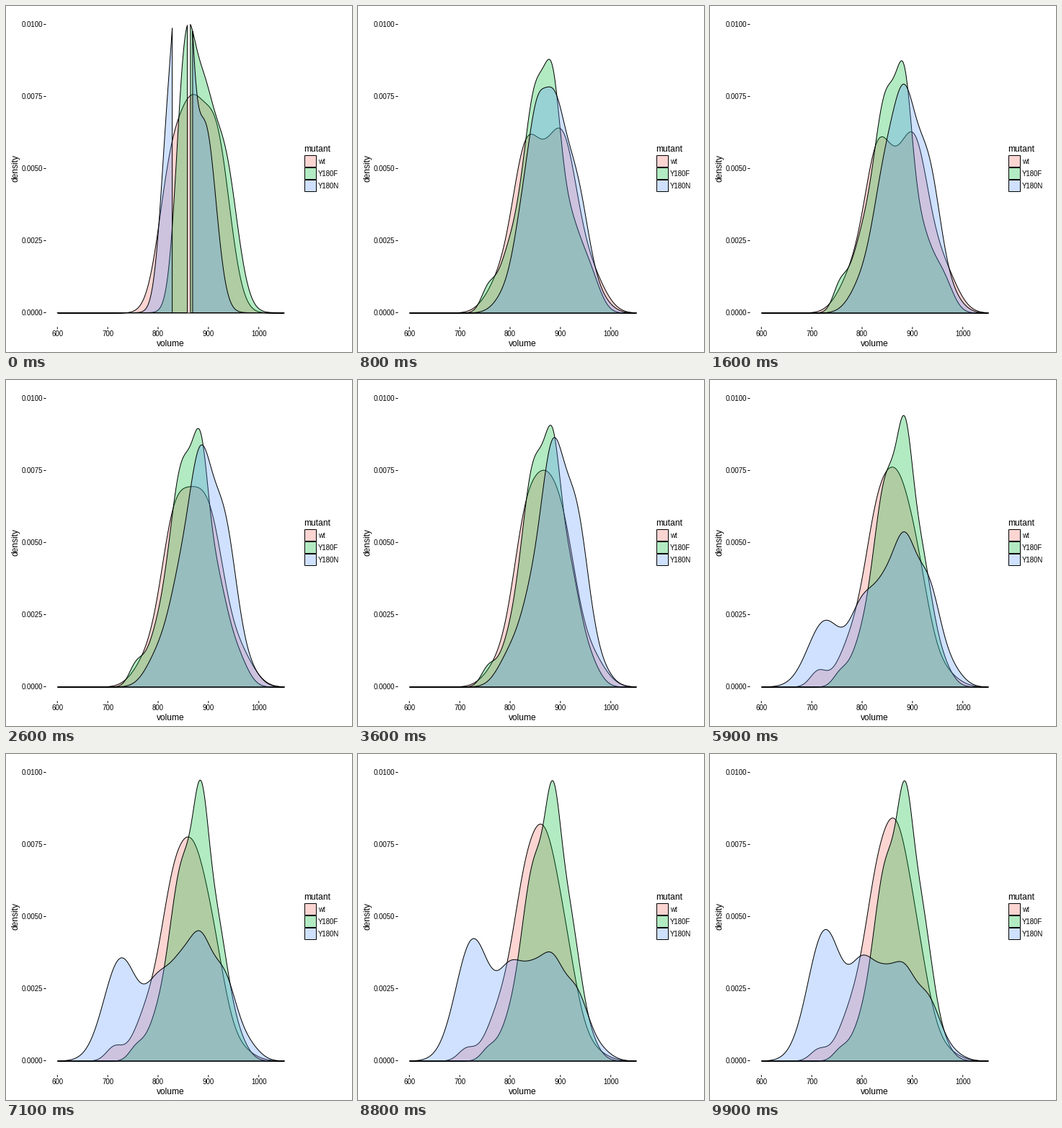
Write a matplotlib script that moves like this. It is 480x480 px and loops after 10 s.

```python
import numpy as np
import matplotlib.pyplot as plt
from matplotlib.animation import FuncAnimation
from matplotlib.collections import PolyCollection
from matplotlib.patches import Rectangle

SIZE, FRAMES, STEP = 480, 100, 100
PX = 0.72                      # points per pixel at 100 dpi
BASE, TOP = 425.5, 400         # baseline row, height of density 0.01
BURN_IN = 3                    # samples already counted at the start
MOMENTS = [0, 16, 36, 48, 71, 99]

# Each density is a sum of bells. The opening shape lists (centre, width, height);
# it then gives way to bells (centre, width, heights at the later moments).
SERIES = {
    "wt": ("#F8766D", [(826, 26, 190), (868, 24, 200), (915, 27, 235)], [
        (712, 16, [0, 0, 24, 18, 14]),
        (780, 28, [48, 32, 52, 65, 65]),
        (830, 26, [202, 200, 200, 205, 210]),
        (868, 24, [80, 158, 162, 176, 203]),
        (905, 27, [210, 188, 163, 152, 145]),
        (960, 28, [58, 40, 25, 15, 14]),
    ]),
    "Y180F": ("#00BA38", [(854, 18, 329), (888, 20, 225), (930, 26, 215)], [
        (755, 14, [32, 22, 15, 15, 12]),
        (795, 22, [76, 44, 48, 42, 35]),
        (848, 26, [294, 302, 302, 264, 266]),
        (884, 15, [166, 152, 145, 184, 172]),
        (912, 25, [115, 170, 180, 195, 215]),
        (960, 20, [42, 24, 22, 20, 14]),
    ]),
    "Y180N": ("#619CFF", [(823, 17, 270), (852, 15, 480), (894, 21, 255)], [
        (726, 34, [0, 0, 24, 142, 181]),
        (800, 25, [38, 42, 110, 92, 114]),
        (845, 24, [172, 112, 115, 108, 92]),
        (884, 22, [235, 272, 200, 130, 95]),
        (930, 25, [196, 230, 170, 112, 82]),
        (980, 22, [16, 20, 20, 18, 9]),
    ]),
}

grid = np.linspace(600, 1050, 512)


def to_px(volume):
    return 71.3 + (volume - 600) * 0.6985


def bell(centre, width):
    return np.exp(-((grid - centre) / width) ** 2 / 2)


def poses(opening, bells):
    """The whole curve at each moment."""
    first = sum(h * bell(c, w) for c, w, h in opening)
    later = sum(np.outer(h, bell(c, w)) for c, w, h in bells)
    return np.vstack([first, later])


def blend(curves, i):
    """Running average: each new sample weighs less than the one before."""
    k = min(np.searchsorted(MOMENTS, i, side="right") - 1, len(MOMENTS) - 2)
    a, b, n = MOMENTS[k] + BURN_IN, MOMENTS[k + 1] + BURN_IN, i + BURN_IN
    u = (1 - a / n) / (1 - a / b)
    return curves[k] * (1 - u) + curves[k + 1] * u


def outlines(height):
    """Closed areas under the curve, broken where it leaves the scale."""
    idx = np.flatnonzero(height <= TOP)
    shapes = []
    for run in np.split(idx, np.flatnonzero(np.diff(idx) > 1) + 1):
        x, y = to_px(grid[run]), BASE - height[run]
        shapes.append(np.column_stack([np.r_[x[0], x, x[-1]], np.r_[BASE, y, BASE]]))
    return shapes


plt.rcParams["font.family"] = "Liberation Sans"
fig = plt.figure(figsize=(SIZE / 100, SIZE / 100), dpi=100, facecolor="white")
ax = fig.add_axes([0, 0, 1, 1])
ax.set(xlim=(0, SIZE), ylim=(SIZE, 0))
ax.axis("off")


def label(x, y, s, size=9.6, **kw):
    ax.text(x, y, s, fontsize=size * PX, va="baseline", color="black", **kw)


def tick(xs, ys):
    ax.plot(xs, ys, color="black", lw=PX, solid_capstyle="butt", snap=False)


for j in range(5):
    y = BASE - j * TOP / 4
    tick([52.3, 55.5], [y, y])
    label(50.7, y + 3.4, f"{j * 0.0025:.4f}", ha="right")
    x = to_px(600 + 100 * j)
    tick([x, x], [445.3, 448.3])
    label(x, 458.4, str(600 + 100 * j), ha="center")

label(228.4, 472, "volume", 12, ha="center")
label(16.7, 225.5, "density", 12, ha="center", rotation=90, rotation_mode="anchor")
label(413.6, 202, "mutant", 12)

layers = []
for j, (name, (rgb, opening, bells)) in enumerate(SERIES.items()):
    style = dict(facecolor=(rgb, 0.3), edgecolor="black", linewidth=PX, snap=False)
    top = 207.5 + 17 * j
    ax.add_patch(Rectangle((414.5, top), 16, 16, **style))
    label(433, top + 11.5, name)
    area = PolyCollection([], zorder=3 + j, **style)
    ax.add_collection(area, autolim=False)
    layers.append((area, poses(opening, bells)))


def draw(i):
    for area, curves in layers:
        area.set_verts(outlines(blend(curves, i)))
    return [area for area, _ in layers]


anim = FuncAnimation(fig, draw, frames=FRAMES, interval=STEP, repeat=True, repeat_delay=0)
plt.show()
```
